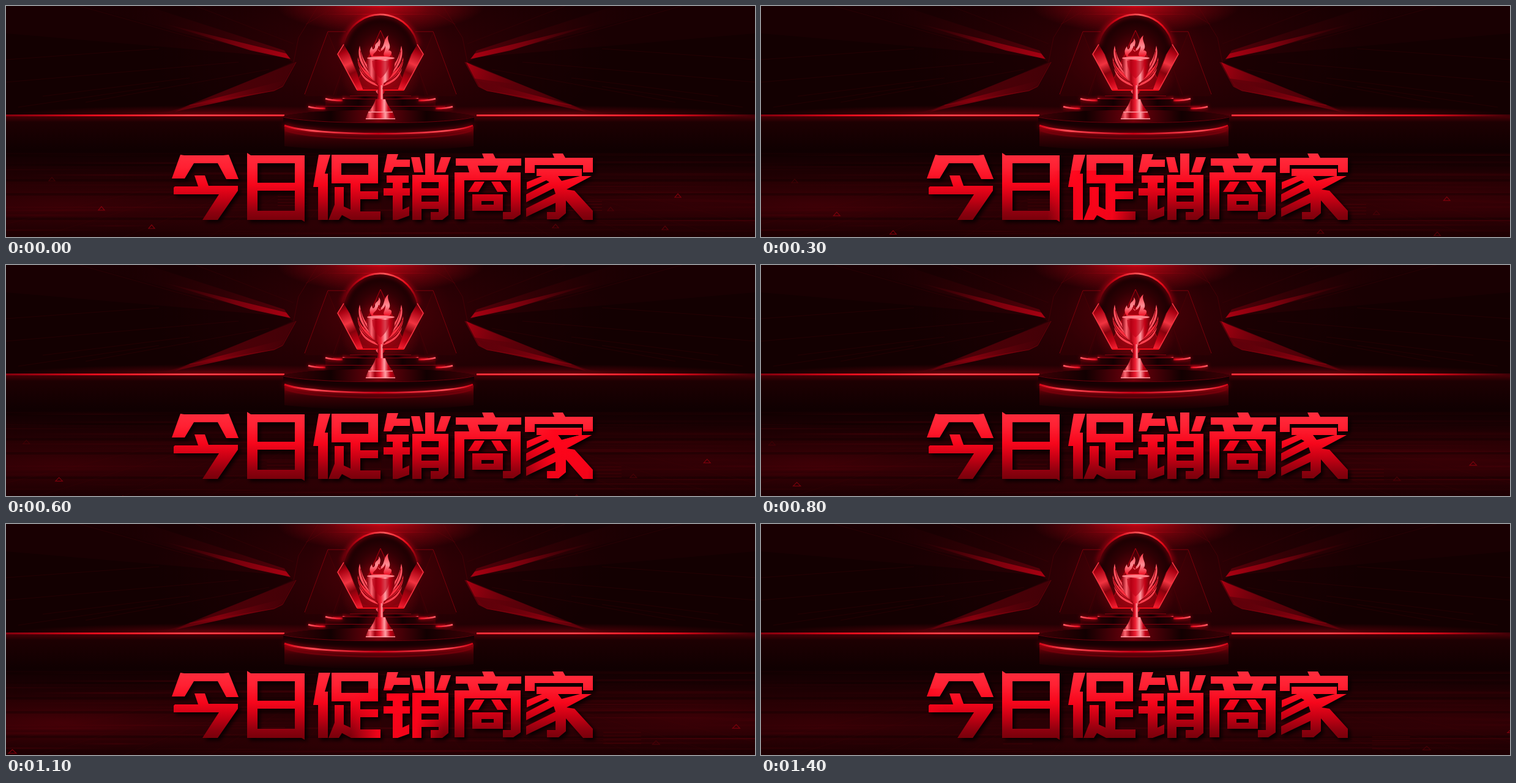
An HTML page with a canvas that plays this animation: 1224 px wide and 379 px high, repeating every 1500 ms.

```html
<!DOCTYPE html>
<html lang="zh">
<head>
<meta charset="utf-8">
<title>今日促销商家</title>
<style>
html, body { margin: 0; width: 100%; height: 100%; overflow: hidden; background: #120002; }
canvas { display: block; width: 1224px; height: 379px; }
</style>
</head>
<body>
<canvas id="stage" width="1224" height="379" role="img" aria-label="今日促销商家"></canvas>
<script>
const W = 1224, H = 379, CX = 612, LOOP = 1500, STEP = 100;
const stage = document.getElementById('stage').getContext('2d');

const layer = () => Object.assign(document.createElement('canvas'), { width: W, height: H }).getContext('2d');
const red = (v, a = 1) => `rgba(${v},${Math.round(v > 200 ? (v - 200) * .3 : 0)},${Math.round(v * .1)},${a})`;

function seeded(s) {
  return () => (s = (s * 16807) % 2147483647) / 2147483647;
}
function grad(c, x0, y0, x1, y1, stops) {
  const g = c.createLinearGradient(x0, y0, x1, y1);
  stops.forEach(([p, col]) => g.addColorStop(p, col));
  return g;
}
function fill(c, d, style) {
  c.fillStyle = style;
  c.fill(new Path2D(d), 'evenodd');
}
function line(c, d, style, width = 1) {
  c.strokeStyle = style;
  c.lineWidth = width;
  c.stroke(new Path2D(d));
}
function neon(c, d, style, width, blur) {
  c.save();
  c.shadowColor = '#ff0018';
  c.shadowBlur = blur;
  line(c, d, style, width);
  c.restore();
}
function glow(c, x, y, rx, ry, v, a) {
  c.save();
  c.translate(x, y);
  c.scale(rx, ry);
  const g = c.createRadialGradient(0, 0, 0, 0, 0, 1);
  g.addColorStop(0, red(v, a));
  g.addColorStop(.5, red(v, a * .4));
  g.addColorStop(1, red(v, 0));
  c.fillStyle = g;
  c.fillRect(-1, -1, 2, 2);
  c.restore();
}
function mirrored(c, draw) {
  draw(false);
  c.save();
  c.translate(2 * CX, 0);
  c.scale(-1, 1);
  draw(true);
  c.restore();
}
// value at time t in a table of [time, value]
function at(table, t) {
  let i = 1;
  while (i < table.length - 1 && table[i][0] < t) i++;
  const [t0, a] = table[i - 1], [t1, b] = table[i];
  return a + (b - a) * Math.min(1, Math.max(0, (t - t0) / (t1 - t0)));
}

/* ---------- hall ---------- */
function drawHall(c) {
  c.fillStyle = '#190002';
  c.fillRect(0, 0, W, H);
  glow(c, CX, 85, 380, 150, 90, .5);
  glow(c, CX, 0, 170, 44, 220, .85);
  glow(c, CX, 75, 115, 95, 130, .4);
  c.fillStyle = grad(c, 510, 0, 714, 0, [[0, red(150, 0)], [.5, red(215, .7)], [1, red(150, 0)]]);
  c.fillRect(510, 0, 204, 2);
  c.fillRect(510, 13, 204, 1);

  mirrored(c, right => {
    fill(c, 'M0 45L455 84L468 92L300 165L235 178H0Z', 'rgba(12,0,2,.45)');
    fill(c, 'M130 0L230 0L455 73L463 86L290 45Z', grad(c, 200, 0, 455, 80, [[0, red(40, .1)], [.6, red(62, .5)], [1, red(105, .7)]]));
    fill(c, 'M250 27L458 78L465 87L400 73Z', grad(c, 250, 27, 460, 84, [[0, red(70, 0)], [.6, red(135, .8)], [1, red(175, .9)]]));
    fill(c, 'M473 92L451 132L438 139L260 176L300 162Z', grad(c, 235, 178, 470, 92, [[0, red(80, 0)], [.4, red(110, .6)], [1, red(right ? 145 : 80, .65)]]));
    fill(c, 'M275 174L300 162L455 122L440 138Z', grad(c, 290, 168, 455, 125, [[0, red(135, .4)], [.35, red(160, .65)], [1, red(75, .2)]]));
    if (right) fill(c, 'M472 92L460 98L385 129L458 119Z', grad(c, 385, 129, 470, 95, [[0, red(120, 0)], [1, red(190, .7)]]));
    line(c, 'M474 92L452 132L438 139L300 163', red(150, .65));
    line(c, 'M0 125L380 92M60 148L300 118M0 88L250 70M120 0L340 62M20 166L250 132M310 0L470 62M130 158L430 104', red(85, .25));
    line(c, 'M555 42H526L498 118L488 145', red(150, .75));
    line(c, 'M526 44L550 104L535 146', red(90, .5));
    fill(c, 'M526 44L498 118L488 148H540L550 104Z', red(70, .22));
    line(c, 'M510 0L478 52L470 92M540 0L490 30', red(105, .4));
    // glowing edge where wall meets floor
    glow(c, 330, 180, 330, 17, 185, .55);
    c.fillStyle = grad(c, 0, 0, 455, 0, [[0, red(right ? 60 : 130)], [.3, red(215)], [.6, red(250)], [1, red(250)]]);
    c.fillRect(0, 178, 455, 3);
    c.fillStyle = grad(c, 60, 0, 455, 0, [[0, red(255, 0)], [.6, 'rgba(255,110,115,.85)'], [1, 'rgba(255,90,100,.65)']]);
    c.fillRect(60, 178.5, 395, 1.5);
  });

  c.fillStyle = grad(c, 0, 181, 0, 240, [[0, '#480006'], [.16, '#1d0002'], [1, '#0f0001']]);
  c.fillRect(0, 181, W, 60);
}

/* ---------- podium and backdrop ---------- */
function drawPodium(c) {
  const disc = c.createRadialGradient(CX, 90, 5, CX, 78, 64);
  disc.addColorStop(0, '#7a000c');
  disc.addColorStop(.6, '#300004');
  disc.addColorStop(1, '#110001');
  c.fillStyle = disc;
  c.beginPath();
  c.arc(CX, 76, 62, 0, 7);
  c.fill();
  c.save();
  c.shadowColor = '#ff0018';
  c.shadowBlur = 9;
  c.strokeStyle = grad(c, 551, 0, 674, 0, [[0, red(90)], [.25, red(215)], [.55, '#ff595c'], [.85, red(230)], [1, red(110)]]);
  c.lineWidth = 2.8;
  c.beginPath();
  c.arc(CX, 76, 62, Math.PI * 1.06, Math.PI * 1.94);
  c.stroke();
  c.restore();

  fill(c, 'M612 40L650 125L642 138H582L574 125Z', grad(c, 0, 40, 0, 138, [[0, red(110, .15)], [1, red(190, .55)]]));
  mirrored(c, () => {
    line(c, 'M612 40L574 125M606 55L582 110', red(170, .85), 1.2);
    fill(c, 'M542 79L552 63L562 80L584 138H574Z', grad(c, 545, 65, 578, 138, [[0, '#4b0006'], [.16, '#a80011'], [.42, '#f13542'], [.62, '#79000b'], [.82, '#b80014'], [1, '#f52537']]));
    line(c, 'M552 63L542 79L574 138', '#f23441', 1.6);
    line(c, 'M562 80L584 137', '#75000a');
  });
  c.fillStyle = red(240);
  c.fillRect(574, 137, 76, 2);
  glow(c, CX, 115, 65, 55, 240, .5);

  const step = (x, y, h, lip) => {
    c.fillStyle = grad(c, x, 0, 2 * CX - x, 0, [[0, '#3b0005'], [.3, '#140002'], [.5, '#570008'], [.7, '#140002'], [1, '#3b0005']]);
    c.fillRect(x, y, 2 * (CX - x), h);
    c.fillStyle = red(125);
    c.fillRect(x + 12, y, 2 * (CX - x) - 24, 1);
    mirrored(c, () => neon(c, `M${x} ${y + lip}Q${x + 8} ${y + lip + 3} ${x + 28} ${y + lip + 3}`,
      grad(c, x, 0, x + 30, 0, [[0, '#ff5c66'], [.8, '#ee1224'], [1, red(120)]]), 2.8, 6));
  };
  step(550, 147, 10, 5);
  step(522, 152, 12, 0);
  step(494, 164, 14, 1);

  fill(c, 'M455 196V230Q612 246 764 230V196Z', grad(c, 0, 200, 0, 240, [[0, '#780009'], [.35, '#3b0005'], [1, '#0f0001']]));
  fill(c, 'M453 181C500 167 724 167 765 181V197C724 216 500 216 453 197Z', '#170002');
  fill(c, 'M453 181C500 167 724 167 765 181C724 195 500 195 453 181Z', grad(c, 453, 0, 765, 0, [[0, '#3d0005'], [.25, '#120001'], [.5, '#75000c'], [.75, '#120001'], [1, '#3d0005']]));
  line(c, 'M453 182C500 195 724 195 765 182', red(105));
  neon(c, 'M455 196C500 214 724 214 763 196', grad(c, 455, 0, 763, 0, [[0, red(210)], [.15, '#ff4a54'], [.5, red(195)], [.85, '#ff4a54'], [1, red(210)]]), 3, 9);
  line(c, 'M457 204C500 222 724 222 761 204', red(130, .6), 3);
}

/* ---------- trophy ---------- */
function drawTrophy(c) {
  const metal = (x0, x1) => grad(c, x0, 0, x1, 0, [[0, '#8b000d'], [.16, '#ff6873'], [.32, '#a40010'], [.5, '#f02034'], [.66, '#ffa0a5'], [.82, '#c50015'], [1, '#76000a']]);
  mirrored(c, () => {
    fill(c, 'M578 65C573 82 580 98 594 112L606 124L598 105C588 96 581 84 578 65Z', '#ff5460');
    fill(c, 'M575 84C573 101 585 116 604 126L592 110C583 103 578 96 575 84Z', '#f9303f');
    fill(c, 'M577 102C580 118 592 127 609 132L602 126C590 121 583 114 577 102Z', '#ff4351');
    line(c, 'M579 73C581 91 589 103 600 116M576 90C579 106 590 116 603 125', '#8c000e', 1.2);
  });
  fill(c, 'M590 85Q612 80 635 85C637 105 630 119 617 127V131H608V127C595 119 588 105 590 85Z', metal(590, 635));
  fill(c, 'M598 90H627Q626 108 612 119Q599 108 598 90Z', 'rgba(190,0,22,.6)');
  c.fillStyle = '#ff7f88';
  c.beginPath();
  c.ellipse(612.5, 85.5, 22.5, 2.6, 0, 0, 7);
  c.fill();
  fill(c, 'M597 83C593 75 594 72 598 66C598 75 604 70 603 65C604 60 611 59 609 53C616 60 607 67 612 71C620 64 616 55 625 48C621 58 632 64 625 73C632 73 631 79 627 83Z', grad(c, 0, 48, 0, 83, [[0, '#ff3b49'], [.55, '#ff8d95'], [1, '#ef1226']]));
  fill(c, 'M600 82C599 77 607 76 607 69C611 77 617 74 620 65C621 74 615 77 618 82ZM609 65C613 70 614 72 611 75C607 72 607 70 609 65Z', '#a3000e');
  fill(c, 'M608 130H617L615 136L620 140L616 145L617 156H607L608 145L604 140L609 136Z', metal(603, 620));
  fill(c, 'M604 153H620C623 163 629 169 632 174H592C596 169 601 163 604 153Z', metal(592, 632));
  fill(c, 'M592 174H632L637 186H587Z', metal(587, 637));
  line(c, 'M592 174H632M588 185H636', '#ffa0a5', 1.6);
}

/* ---------- lettering ---------- */
const glyphs = [
  'M285 244L291 245H355L364 244L380 284H360L346 258H307L292 283H271ZM308 278H325L331 295H379V303L346 351H321L348 309H274V298L276 296H314Z',
  'M394 241L400 245H488V354L483 351H394ZM411 258V290H472V258ZM411 303V336H472V303Z',
  'M511 244H530L521 275H526V351H510V297H502ZM532 244H608V291H579V304H608V317H579V337H612V351H564L549 343L544 351H527L537 326V297H552V329L563 334V291H532ZM548 258V277H592V258Z',
  'M623 243H641L638 252H660V264H634L630 273H617ZM622 278H658V290H648V299H660V311H648V334L659 329V344L640 351H632V311H617V299H632V290H622Z',
  'M685 242H700V277H723V343L713 351H694V338H707V333H679V351H664V277H685ZM662 248H676L682 273H667ZM711 248H727L718 273H703ZM679 289V299H707V289ZM679 311V321H707V311Z',
  'M778 242H796L800 250H842V262H822L818 273H841V342L829 350H812V338H825V286H749V350H733V273H757L754 262H735V250H781ZM771 262L775 273H800L804 262ZM766 288H782L772 305H755ZM793 288H808L820 305H803ZM762 309H812V336H762ZM777 320V326H797V320Z',
  'M893 242H910L914 249H959V273H943V261H864V274H848V249H896ZM867 267H941V279H902L908 287L938 279H957L916 301L929 303L959 336V351H943L915 319V340L903 350H884V338H898V323L850 346V332L898 308L895 299L850 322V309L888 289L883 286L851 301V289L876 279H867Z'
];
const title = new Path2D(glyphs.join(''));
const letterFill = grad(stage, 0, 243, 0, 352, [[0, '#ff2d3d'], [.2, '#ff2032'], [.46, '#f6061b'], [.68, '#c40013'], [.88, '#8c000e'], [1, '#77000a']]);
const sweep = [[0, 180], [200, 425], [400, 672], [600, 925], [700, 1050], [800, 1060], [1000, 787], [1200, 500], [1400, 225], [1500, 180]];

function drawTitle(c, t) {
  c.save();
  c.shadowColor = 'rgba(0,0,0,.85)';
  c.shadowBlur = 6;
  c.shadowOffsetX = 4;
  c.shadowOffsetY = 4;
  c.fillStyle = letterFill;
  c.fill(title, 'evenodd');
  c.restore();
  const x = at(sweep, t);
  c.save();
  c.clip(title, 'evenodd');
  c.fillStyle = grad(c, x - 75, 290, x + 75, 305, [[0, 'rgba(255,4,26,0)'], [.3, 'rgba(255,4,26,.9)'], [.7, 'rgba(255,4,26,.9)'], [1, 'rgba(255,4,26,0)']]);
  c.fillRect(x - 100, 270, 200, 85);
  c.restore();
}

/* ---------- floor ---------- */
const rnd = seeded(77);
const streaks = Array.from({ length: 120 }, () => ({
  x: rnd() * W, y: 242 + rnd() * 132, len: 60 + rnd() * 260, v: 40 + rnd() * 45, h: 1 + rnd() * 2, ph: rnd() * 6.3
}));
const haze = [[0, .5], [200, .85], [400, .5], [600, .5], [1000, .95], [1200, .9], [1400, .45], [1500, .5]];
// start place, approach rate per ms and brightness of each floor marker
const markers = [
  [156, 333, 2.2e-4, 150], [238, 363, 1.86e-4, 150], [1098, 312, 1.49e-4, 150],
  [1077, 365, 1.9e-4, 100], [898, 362, 1.8e-4, 100], [988, 334, 1.5e-4, 80], [75, 285, 1.2e-4, 70]
];

function drawFloor(c, t) {
  const power = at(haze, t);
  c.fillStyle = grad(c, 0, 232, 0, H, [[0, 'rgba(15,0,1,0)'], [.12, '#150002'], [.4, '#240003'], [.7, '#2a0004'], [1, '#1d0002']]);
  c.fillRect(0, 232, W, H - 232);
  glow(c, 90, 326, 330, 48, 110, power * .42);
  glow(c, 1130, 318, 320, 52, 90, power * .4);
  glow(c, CX, 362, 420, 30, 70, .4);
  for (const s of streaks) {
    const a = (.22 + .38 * power) * (.65 + .35 * Math.sin(t / 170 + s.ph));
    c.fillStyle = grad(c, s.x - s.len, 0, s.x + s.len, 0, [[0, red(s.v, 0)], [.5, red(s.v, a)], [1, red(s.v, 0)]]);
    c.fillRect(s.x - s.len, s.y, 2 * s.len, s.h);
  }
  c.fillStyle = 'rgba(10,0,1,.3)';
  for (const y of [243, 259, 284, 307, 347]) c.fillRect(0, y, W, 4);

  const drift = 1 / (1 - 1.6e-4 * t);
  for (let i = -5; i <= 5; i++) line(c, `M${CX + i * 75} 300L${CX + i * 140} 379`, red(80, .16));
  for (let i = 0; i < 4; i++) {
    const y = 212 + (100 + i * 5) * drift;
    c.fillStyle = red(120, .3);
    c.fillRect(CX - 168 * drift, y, 48, 1);
    c.fillRect(CX + 300 * drift, y + 8, 62, 1);
  }
  for (const [x0, y0, rate, v] of markers) {
    const k = 1 / (1 - rate * t), x = CX + (x0 - CX) * k, y = 204 + (y0 - 204) * k, s = 5 * k;
    line(c, `M${x - s} ${y + 2}L${x} ${y - 4}L${x + s} ${y + 2}Z`, red(v, .75), 1.2);
  }
}

const hall = layer();
drawHall(hall);
drawPodium(hall);
drawTrophy(hall);

function frame(now) {
  const t = Math.floor((now % LOOP) / STEP) * STEP;
  stage.drawImage(hall.canvas, 0, 0);
  drawFloor(stage, t);
  drawTitle(stage, t);
  requestAnimationFrame(() => frame(performance.now()));
}
frame(0);
</script>
</body>
</html>
```
